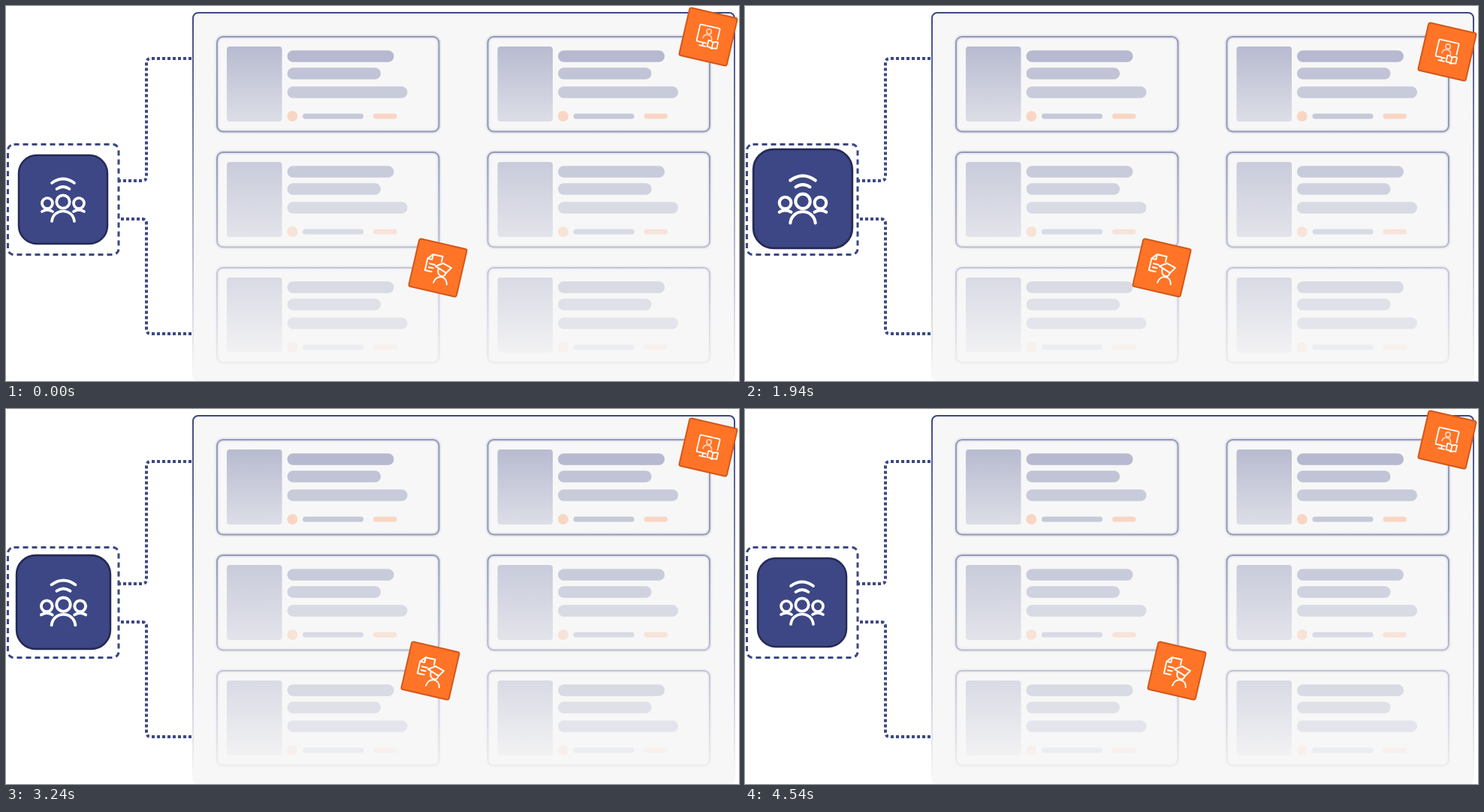
Recreate the animation shown at these times as an HTML page. Size 976 by 500 pixels, loop 4560 ms.

```html
<!DOCTYPE html>
<html lang="en">
<head>
<meta charset="utf-8">
<title>Community cards</title>
<style>
  html, body { margin: 0; width: 100%; height: 100%; overflow: hidden; background: #fff; }
  svg { display: block; }
  .line { fill: none; stroke: #3d4785; }
  .glyph { fill: none; stroke: #fff; stroke-linecap: round; stroke-linejoin: round; }
</style>
</head>
<body>
<svg width="976" height="500" viewBox="0 0 976 500">
  <defs>
    <linearGradient id="edge" gradientUnits="userSpaceOnUse" x1="0" y1="9" x2="0" y2="490">
      <stop stop-color="#3d4785"/>
      <stop offset="1" stop-color="#3d4785" stop-opacity="0"/>
    </linearGradient>
    <linearGradient id="outline" gradientUnits="userSpaceOnUse" x1="0" y1="200" x2="0" y2="476">
      <stop stop-color="#3d4785" stop-opacity=".5"/>
      <stop offset="1" stop-color="#3d4785" stop-opacity=".05"/>
    </linearGradient>
    <g id="badge">
      <rect x="-32.5" y="-32.5" width="65" height="65" rx="2.5" fill="#ff7426" stroke="#d2581c" stroke-width="2"/>
    </g>
  </defs>

  <rect x="248" y="8" width="723" height="492" rx="8" fill="#f7f7f7"/>
  <rect x="249" y="9" width="721" height="490" rx="7" fill="none" stroke="url(#edge)" stroke-width="2"/>
  <g id="cards"></g>

  <g class="line">
    <rect x="2.5" y="184.5" width="147.5" height="147" rx="8" stroke-width="3" stroke-dasharray="7 5"/>
    <g stroke-width="4" stroke-dasharray="4 3">
      <path d="M247 70H193Q187 70 187 76V227Q187 233 181 233H150"/>
      <path d="M247 437H193Q187 437 187 431V290Q187 284 181 284H150"/>
    </g>
  </g>

  <g id="tile">
    <rect x="-59" y="-59" width="118" height="118" rx="24" fill="#3d4785" stroke="#252b55" stroke-width="2.5"/>
    <g class="glyph" stroke-width="3.7">
      <path d="M-15 -22Q0 -33 15 -22M-8.5 -14Q0 -20 8.5 -14"/>
      <circle cy="3" r="8.7"/>
      <circle cx="-21" cy="5" r="7"/>
      <circle cx="21" cy="5" r="7"/>
      <path d="M-15 29C-13 11 13 11 15 29M-28 16Q-21 11.500 -14 16M28 16Q21 11.500 14 16"/>
    </g>
  </g>

  <g id="course">
    <use href="#badge"/>
    <g class="glyph" stroke-width="1.8">
      <path d="M-1 9H-12.500Q-14 9 -14 7.500V-12.500Q-14 -14 -12.500 -14H11.500Q13 -14 13 -12.500V1M-5 9V13M-9 13.500H-1"/>
      <path d="M8 6Q5 4 1.500 4.500V13Q5 12.500 8 14.500Q11 12.500 14.500 13V4.500Q11 4 8 6V14"/>
      <g opacity=".65"><circle cx="-.6" cy="-7" r="3.2"/><path d="M-6.500 3Q-6 -2.500 -.6 -2.500T5.300 3"/></g>
    </g>
  </g>

  <g id="graduate">
    <use href="#badge"/>
    <g class="glyph" stroke-width="2">
      <path d="M-7 7H-16V-9L-10 -16H3V-9M-16 -9H-10V-16M-12 -3H-5M-12 2H-6"/>
      <path d="M-3.500 -1.300L5.500 -7.400L17.500 -4L12.300 4.300Z"/>
      <path d="M1 1.500C1 12 12 12 12 4.500M-1.300 20.500C0 8 15 8 16.500 19"/>
    </g>
  </g>
</svg>
<script>
const BLUE = '#3d4785', ORANGE = '#ff7426';
const pill = (x, y, w, h, alpha, fill = BLUE) =>
  `<rect x="${x}" y="${y - h / 2}" width="${w}" height="${h}" rx="${h / 2}" fill="${fill}" fill-opacity="${alpha}"/>`;

// Opacities for each row, fading towards the bottom.
const rows = [
  { bars: [.35, .29, .25], image: [.34, .145], small: .26, accent: .25 },
  { bars: [.25, .21, .17], image: [.25, .11], small: .17, accent: .15 },
  { bars: [.167, .13, .1], image: [.165, .03], small: .06, accent: .05 }
];

function card(row, i, x) {
  const y = 41 + i * 154;
  const frame = `<rect x="${x}" y="${y}" width="295.5" height="126.500" rx="8" fill="none" stroke="url(#outline)"`;
  const widths = [142, 124.5, 160], tops = [26, 49, 74];
  return `${frame} stroke-width="6" opacity=".16"/>${frame} stroke-width="2"/>
    <rect x="${x + 13}" y="${y + 13}" width="73.5" height="100" rx="4" fill="url(#image${i})"/>
    ${row.bars.map((a, k) => pill(x + 93.5, y + tops[k], widths[k], 15.5, a)).join('')}
    <circle cx="${x + 100.3}" cy="${y + 106}" r="7" fill="${ORANGE}" fill-opacity="${row.accent}"/>
    ${pill(x + 114, y + 106, 81, 7, row.small)}
    ${pill(x + 208, y + 106, 31.5, 7, row.accent, ORANGE)}`;
}

const $ = id => document.getElementById(id);
$('cards').innerHTML = rows.map((row, i) =>
  `<linearGradient id="image${i}" x1="0" y1="0" x2="0" y2="1">
    <stop stop-color="${BLUE}" stop-opacity="${row.image[0]}"/>
    <stop offset="1" stop-color="${BLUE}" stop-opacity="${row.image[1]}"/>
  </linearGradient>` + card(row, i, 281) + card(row, i, 641.5)).join('');

const HOLD = 800, MOVE = 320, PHASE = 1140, STEP = 20;

function place(id, x, y, rest) {
  $(id).setAttribute('transform', `translate(${x} ${y}) ${rest}`);
}

function draw() {
  const t = Math.floor(performance.now() % (4 * PHASE) / STEP) * STEP;
  const p = Math.min(1, Math.max(0, (t % PHASE - HOLD) / MOVE));
  const eased = p * p * (3 - 2 * p);
  const v = Math.floor(t / PHASE) % 2 ? 1 - eased : eased;
  place('tile', 76 + v, 258 - v, `scale(${1 + v * .115})`);
  place('course', 935, 41 + 20 * v, 'rotate(13)');
  place('graduate', 575 - 20 * v, 349, 'rotate(13)');
  requestAnimationFrame(draw);
}
draw();
</script>
</body>
</html>
```
